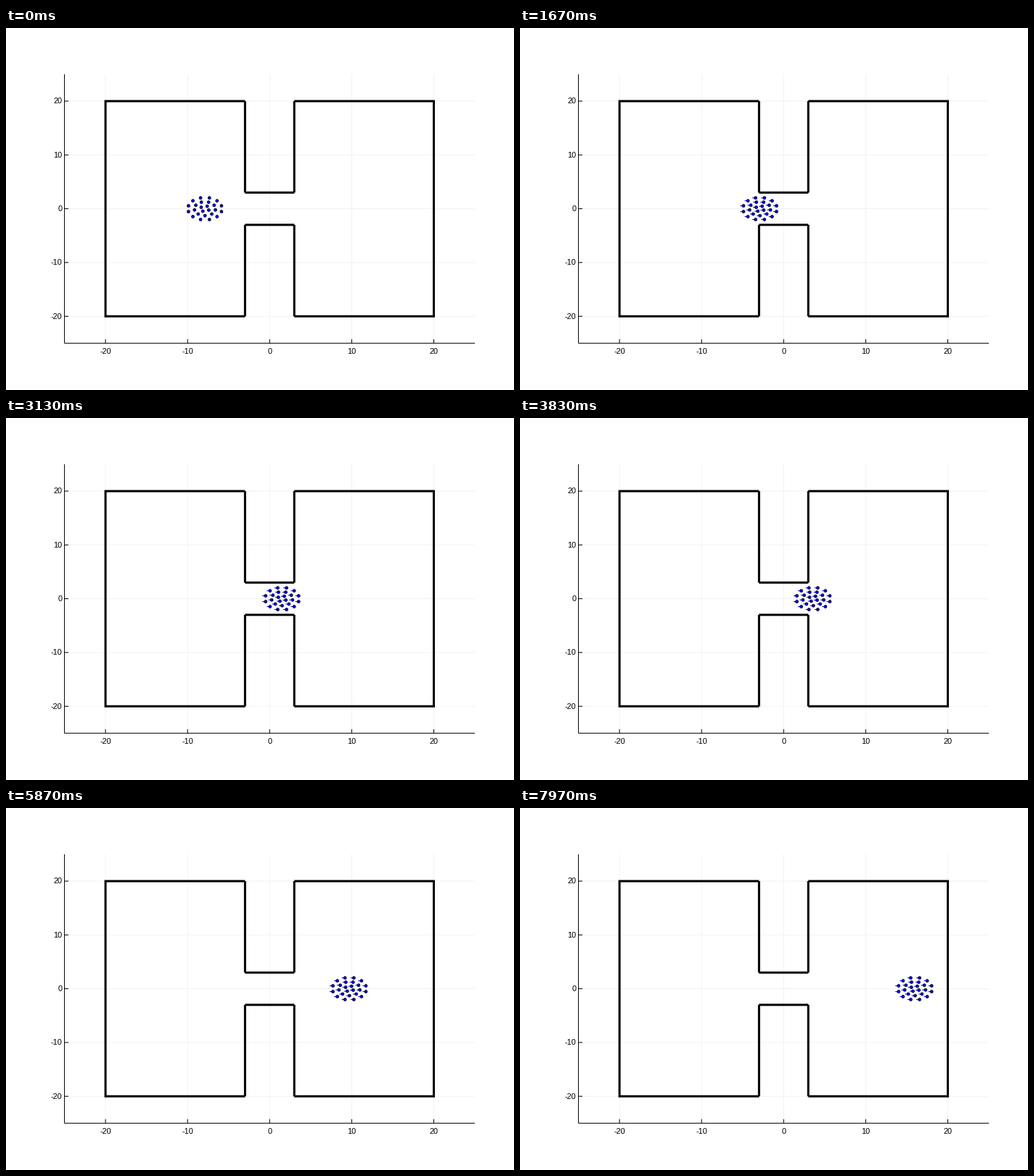
Animation of 700x500 px, one loop 8000 ms. Source, as a matplotlib script:

```python
import numpy as np
import matplotlib.pyplot as plt
from matplotlib.animation import FuncAnimation
from matplotlib.collections import LineCollection

LOOP_MS, TICK_MS = 8000, 20
STEPS_PER_MS = 0.03            # the swarm moves 30 times a second
PX = 0.72                      # points per pixel at 100 dpi
X0, Y0 = 363.3, 249.6          # pixel position of the data zero
SX, SY = 11.31, 7.43           # pixels per data unit
STEP = 0.1 * SX                # swarm advance per step
TAIL = 4                       # trail length in steps
START_X = -7.88                # swarm centre at the start
RINGS = [(12, 2.08, 15), (9, 1.29, 30), (4, 0.53, 60)]  # count, radius, phase


def px(x, y):
    return X0 + SX * x, Y0 - SY * y


def ring(count, radius, phase):
    a = np.radians(phase + 360 / count * np.arange(count))
    return np.column_stack(px(START_X + radius * np.cos(a), radius * np.sin(a)))


swarm = np.vstack([ring(*r) for r in RINGS])

fig = plt.figure(figsize=(7, 5), dpi=100, facecolor="white")
ax = fig.add_axes([0, 0, 1, 1])
ax.set_xlim(0, 700)
ax.set_ylim(500, 0)
ax.axis("off")


def line(points, width, color="black", z=2):
    xs, ys = zip(*points)
    ax.plot(xs, ys, color=color, lw=width * PX, zorder=z, snap=False,
            solid_capstyle="butt", solid_joinstyle="miter")


def label(x, y, value, ha):
    ax.text(x, y, str(value), ha=ha, va="baseline", color="black",
            family="Liberation Sans", fontsize=11 * PX)


left, bottom = px(-25, -25)
right, top = px(25, 25)

# Grid, ticks and labels
for v in range(-20, 21, 10):
    gx, gy = px(v, v)
    line([(gx, top), (gx, bottom)], 1, "#f2f2f2", 1)
    line([(left, gy), (right, gy)], 1, "#f2f2f2", 1)
    line([(gx, bottom), (gx, bottom - 5.5)], 1)
    line([(left, gy), (left + 5.5, gy)], 1)
    label(gx, 450.5, v, "center")
    label(77.3, gy + 3.4, v, "right")

line([(left, top), (left, bottom)], 1)
line([(left, bottom), (right, bottom)], 1)

# Two rooms joined by a corridor
for s in (-1, 1):
    room = [(3 * s, 20), (20 * s, 20), (20 * s, -20), (3 * s, -20)]
    line([px(*p) for p in room], 3, z=3)
    for t in (-1, 1):
        line([px(3 * s, 20 * t), px(3 * s, 3 * t)], 3, z=3)
    line([px(-3, 3 * s), px(3, 3 * s)], 3, z=3)

trails = LineCollection([], colors="blue", linewidths=PX, zorder=4)
trails.set_snap(False)
trails.set_capstyle("butt")
ax.add_collection(trails, autolim=False)

# One size per dot keeps positions free of pixel rounding
dots = ax.scatter(*swarm.T, s=np.full(len(swarm), (4 * PX) ** 2),
                  c="blue", edgecolors="black", linewidths=0.7 * PX, zorder=5)
dots.set_snap(False)


def draw(i):
    # The extra time rounds step changes to the nearest 10 ms
    step = int((i * TICK_MS + 15) * STEPS_PER_MS)
    heads = swarm + (STEP * step, 0)
    tails = heads - (STEP * min(step, TAIL), 0)
    dots.set_offsets(heads)
    trails.set_segments(np.stack([tails, heads], axis=1) if step else [])
    return trails, dots


anim = FuncAnimation(fig, draw, frames=LOOP_MS // TICK_MS,
                     init_func=lambda: draw(0), interval=TICK_MS,
                     repeat=True, repeat_delay=0)
plt.show()
```
